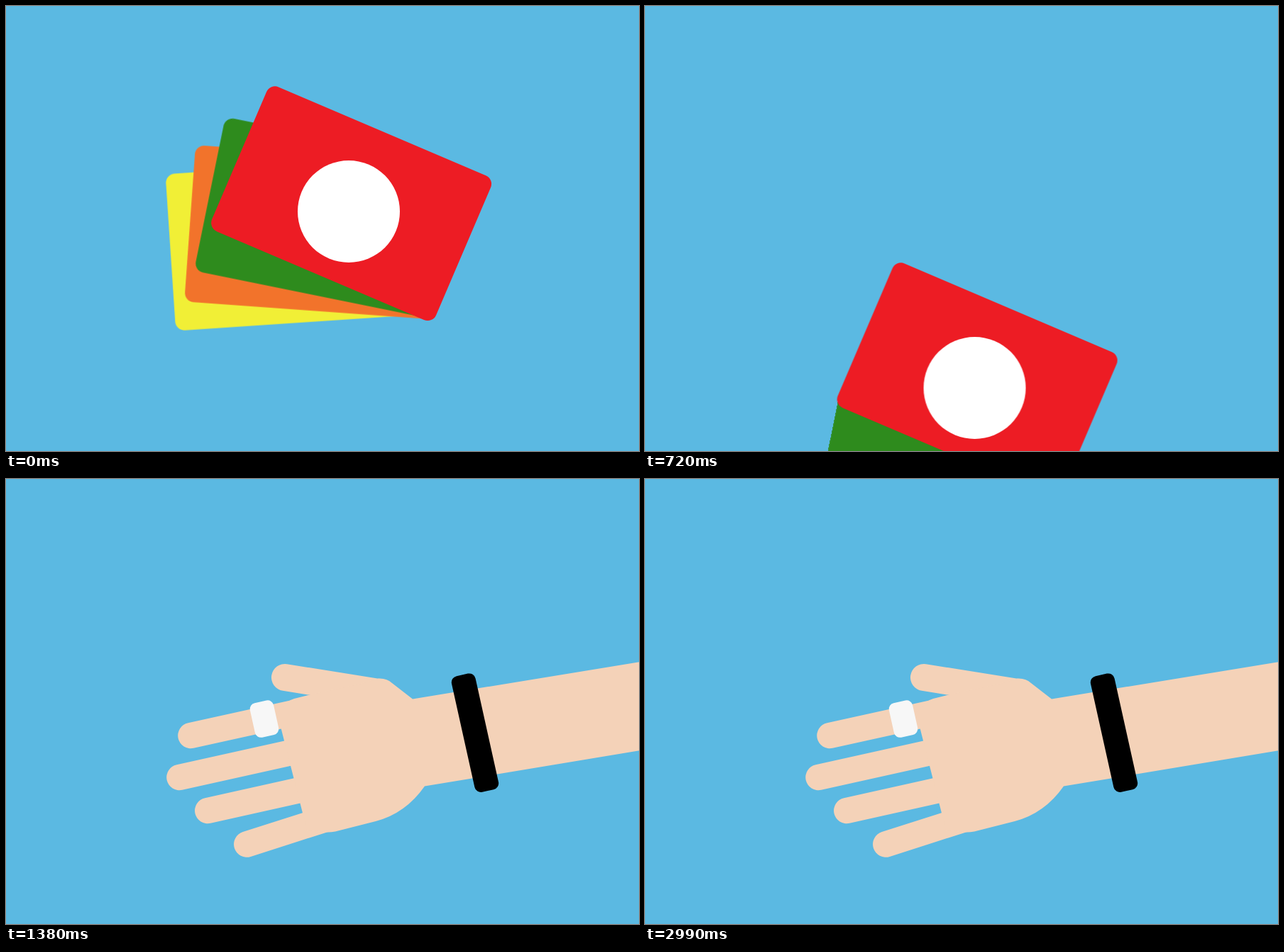
These frames come from a looping animation (892x628 px, 4860 ms). An HTML page:

```html
<!DOCTYPE html>
<html lang="en">
<head>
<meta charset="utf-8">
<title>Cards to ring</title>
<style>
  html, body { margin: 0; width: 100%; height: 100%; overflow: hidden; background: #5bb9e2; }
  svg { display: block; width: 100%; height: 100%; }

  .yellow, .orange, .green, .red, .hand, .waves {
    animation: 4860ms linear -1ms infinite;
  }
  .yellow { animation-name: drop-yellow; fill: #f1ef36; }
  .orange { animation-name: drop-orange; fill: #f2732b; }
  .green  { animation-name: drop-green;  fill: #2e8b1d; }
  .red    { animation-name: drop-red;    fill: #ed1c24; }
  .hand   { animation-name: slide; }
  .waves  { animation-name: pulse; animation-timing-function: step-end; }

  /* Cards fall one after another (0, 150, 270, 360 ms), in 30 ms steps. */
  @keyframes drop-yellow {
    0% { transform: none; animation-timing-function: steps(26); }
    16.0494%, 100% { transform: translate(-3px, 871px); }
  }
  @keyframes drop-orange {
    0% { transform: none; }
    3.0864% { transform: none; animation-timing-function: steps(26); }
    19.1358%, 100% { transform: translate(-41px, 758px); }
  }
  @keyframes drop-green {
    0% { transform: none; }
    5.5556% { transform: none; animation-timing-function: steps(26); }
    21.6049%, 100% { transform: translate(-56px, 655px); }
  }
  @keyframes drop-red {
    0% { transform: none; }
    7.4074% { transform: none; animation-timing-function: steps(26); }
    23.4568%, 100% { transform: translate(-40px, 539.5px); }
  }
  @keyframes slide {
    0% { transform: translate(740px, -27.8px); }
    16.0494% { transform: translate(740px, -27.8px); animation-timing-function: steps(20); }
    28.3951%, 100% { transform: none; }
  }
  @keyframes pulse {
    0% { opacity: 0; transform: none; }
    46.2963% { opacity: 1; transform: none; }
    51.8519% { opacity: 0; transform: none; }
    55.9671% { opacity: 1; transform: translate(-.5px, -.7px); }
    61.5226%, 100% { opacity: 0; transform: none; }
  }

  .skin { fill: #f4d2b8; }
  .finger { fill: none; stroke: #f4d2b8; stroke-width: 36.5; stroke-linecap: round; }
  .thumb { stroke-width: 38; }
  .arcs { fill: none; stroke: #fff; stroke-width: 10.5; stroke-linecap: round; }
</style>
</head>
<body>
<svg viewBox="0 0 892 628" preserveAspectRatio="none">
  <defs>
    <rect id="card" x="-171.8" y="-110.8" width="343.6" height="221.6" rx="13"/>
    <path id="arcs" d="M267 318.5A84 84 0 0 1 355 238.5M298 318.5A51 51 0 0 1 350.5 269M324.5 316A21 21 0 0 1 345 299"/>
  </defs>

  <g class="yellow"><use href="#card" transform="translate(403.4 336.5) rotate(-3.8)"/></g>
  <g class="orange"><use href="#card" transform="translate(430.6 318.9) rotate(4.1)"/></g>
  <g class="green"><use href="#card" transform="translate(455.4 299.3) rotate(11.5)"/></g>
  <g class="red">
    <use href="#card" transform="translate(486.6 278.7) rotate(23.15)"/>
    <circle cx="483" cy="290" r="72" fill="#fff"/>
  </g>

  <g class="hand">
    <path class="finger" d="M260.5 362L410 329M244.5 421L420 382M284.3 468L430 435.5M339.3 515.5L450 480"/>
    <path class="finger thumb" d="M393 280L525 301"/>
    <path class="skin" d="M382 330Q394 313 406 310L428 304.5L500 289L525 281.5Q537 281 544 288L573 310.5L900 257V382L590 433.5Q563 472 521 483L464 497.5Q455 499 447 498L424 495Z"/>
    <rect x="-17.2" y="-83.8" width="34.4" height="167.6" rx="9" transform="translate(661 358.2) rotate(-12.5)"/>
    <rect x="-17" y="-24.8" width="34" height="49.6" rx="8.5" fill="#f7f7f7" transform="translate(364 338.6) rotate(-12.5)"/>
  </g>

  <g class="waves">
    <g class="arcs">
      <use href="#arcs"/>
      <use href="#arcs" transform="rotate(180 364.5 339.5)"/>
    </g>
  </g>
</svg>
</body>
</html>
```
